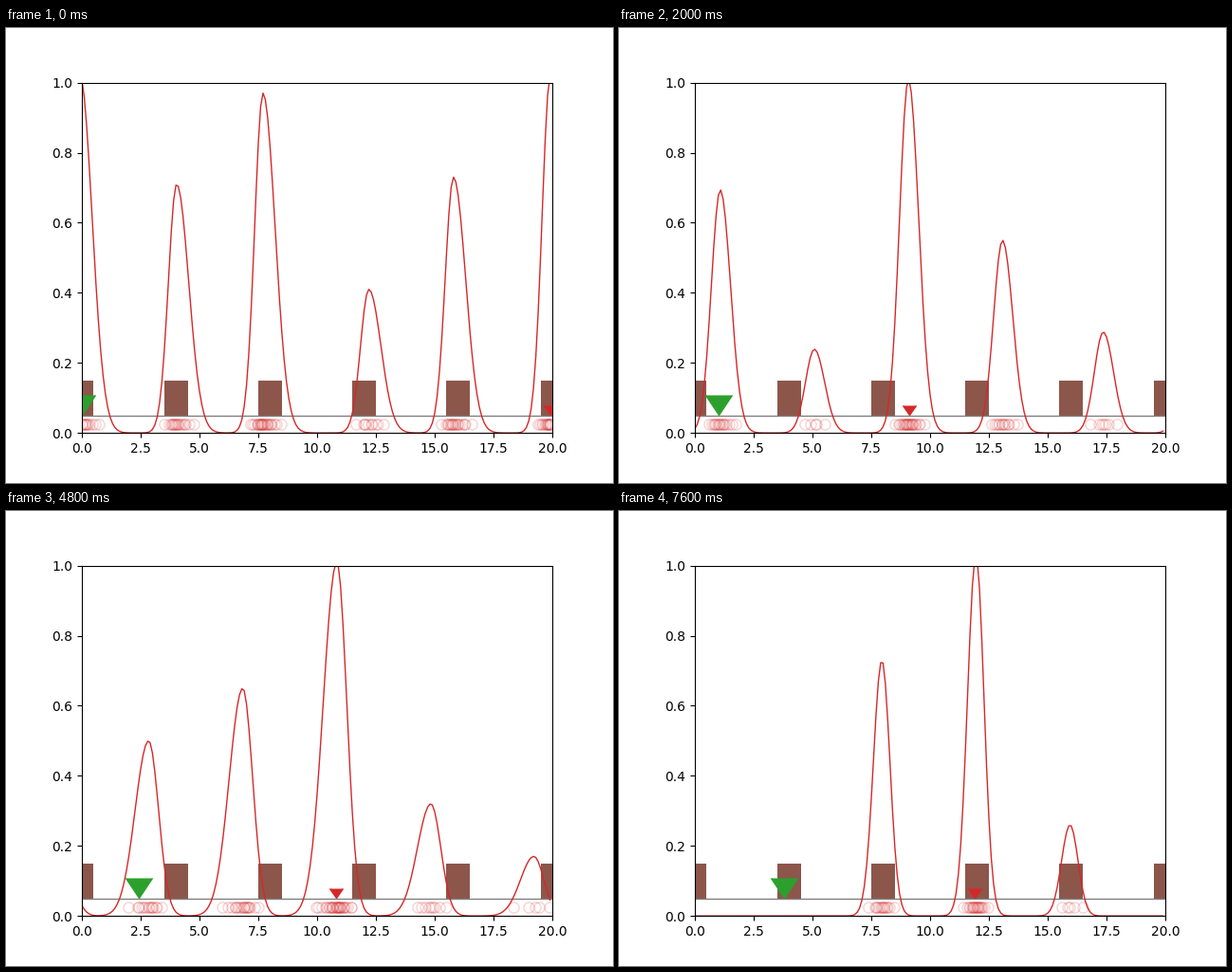
A matplotlib script for the animation above (8000 ms loop, 640 by 480 pixels).

```python
import numpy as np
import matplotlib.pyplot as plt
from matplotlib.animation import FuncAnimation
from matplotlib.patches import Rectangle

WORLD = 20
DOOR_GAP = 4
FRAMES = 20
STEP = 0.2
GROUND = 0.05
POINTER_Y = 0.053
GRID = np.arange(0, WORLD, 0.1)

# Key times, with the shared drift and the height of each hypothesis there.
KEYS = [0, 3, 8, 12, 16, 19]
DRIFT = [0, 0.68, 1.68, 2.84, 3.0, 3.95]
HEIGHTS = [
    [1.02, 0.57, 0.88, 0.50, 0.34, 0],
    [0.71, 0.185, 0.32, 0.65, 0.75, 0.73],
    [0.97, 1.01, 1.01, 1.01, 1.01, 1.03],
    [0.41, 0.53, 0.58, 0.32, 0.52, 0.26],
    [0.73, 0.26, 0.33, 0.17, 0, 0],
]
START = [-0.08, 0.03, -0.3, 0.2, -0.2]  # initial offset, gone by the second key
LEAD = [0, 0, 0, 0, 0.4]                # how far a hypothesis runs ahead midway


def centre(k, frame):
    start = START[k] * max(0, 1 - frame / KEYS[1])
    lead = LEAD[k] * np.sin(np.pi * frame / FRAMES)
    return DOOR_GAP * k + np.interp(frame, KEYS, DRIFT) + start + lead


def widths(frame):
    """Left and right spread: broad between doors, narrow beside them."""
    mean = 0.35 + 0.15 * abs(np.sin(np.pi * (frame - 3) / 16))
    skew = 0.08 * np.cos(2 * np.pi * frame / 26)
    return mean - skew, mean + skew


def hypotheses(frame):
    return [(centre(k, frame), np.interp(frame, KEYS, h))
            for k, h in enumerate(HEIGHTS)]


def belief(frame):
    left, right = widths(frame)
    total = np.zeros_like(GRID)
    for x, h in hypotheses(frame):
        d = (GRID - x + WORLD / 2) % WORLD - WORLD / 2
        total += h * np.exp(-0.5 * (d / np.where(d < 0, left, right))**2)
    return total


def particles(frame):
    """Stratified samples, slightly narrower than the smoothed belief."""
    rng = np.random.default_rng(frame)
    left, right = widths(frame)
    spots = []
    for x, h in hypotheses(frame):
        n = int(round(28 * h * (left + right)))
        u = np.clip((np.arange(n) + rng.random(n)) / max(n, 1), 0.03, 0.97)
        z = np.log(u / (1 - u)) / 1.7
        spots.extend(x + 0.75 * z * np.where(z < 0, left, right))
    return np.array(spots) % WORLD


fig, ax = plt.subplots(figsize=(6.4, 4.8), dpi=100)
ax.set_xlim(0, WORLD)
ax.set_ylim(0, 1)
for door in range(0, WORLD + 1, DOOR_GAP):
    ax.add_patch(Rectangle((door - 0.5, GROUND), 1, 0.1, color="tab:brown", lw=0))
ax.plot([0, WORLD], [GROUND, GROUND], color="tab:gray", lw=1)
curve, = ax.plot([], [], color="tab:red", lw=1)
cloud, = ax.plot([], [], "o", ms=8, mfc="none", mec="tab:red", alpha=0.2)
robot, = ax.plot([], [], marker=7, ms=20, color="tab:green", ls="none")
guess, = ax.plot([], [], marker=7, ms=10, color="tab:red", ls="none")


def update(frame):
    density = belief(frame)
    spots = particles(frame)
    curve.set_data(GRID, density)
    cloud.set_data(spots, np.full(len(spots), GROUND / 2))
    robot.set_data([STEP * frame], [POINTER_Y])
    guess.set_data([GRID[density.argmax()]], [POINTER_Y])
    return curve, cloud, robot, guess


anim = FuncAnimation(fig, update, frames=FRAMES, interval=400, repeat=True)
plt.show()
```
